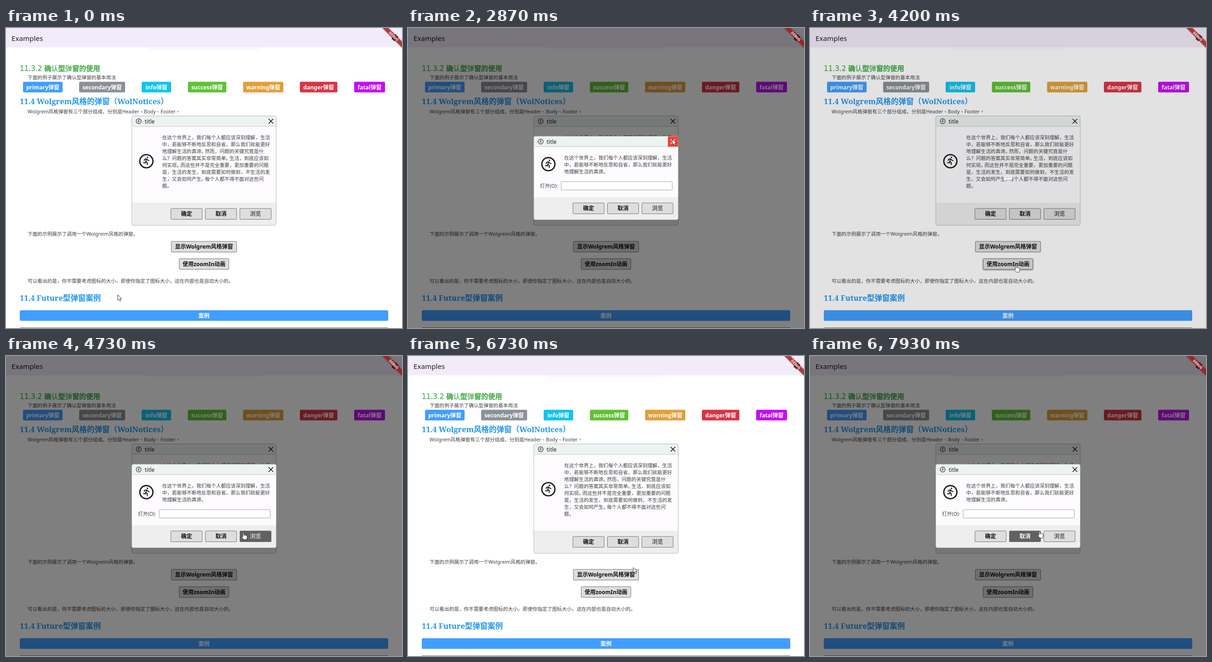
Write an HTML page that moves like this. It is 861x650 px and loops after 8 s.

```html
<!DOCTYPE html>
<html lang="zh-CN">
<head>
<meta charset="utf-8">
<title>Examples</title>
<style>
  html, body { margin: 0; width: 100%; height: 100%; overflow: hidden; background: #fff; }
  svg { display: block; width: 861px; height: 650px; }
  text { font-family: 'Noto Sans', 'Noto Sans CJK SC', 'Noto Sans CJK', sans-serif; font-size: 10.67px; fill: #3f3f3f; }
  .serif { font-family: 'Noto Serif', 'Noto Sans CJK TC', 'Noto Sans CJK', serif; font-size: 16.5px; font-weight: 700; fill: #2196f3; }
  .green { font-family: 'DejaVu Sans', 'Noto Sans CJK SC', 'Noto Sans CJK', sans-serif; font-size: 15.2px; fill: #4caf50; stroke: #4caf50; stroke-width: .3; }
  .centered { font-family: 'Noto Sans', 'Noto Sans CJK TC', 'Noto Sans CJK', sans-serif; }
  .label { font-size: 12px; font-weight: 600; text-anchor: middle; fill: #111; }
  .light { fill: #fff; }
  .button rect { fill: #dfdde0; stroke: #67676a; stroke-width: .9; }
  .button.hover rect { fill: #616161; }
  .button.hover text { fill: #fff; }
  .button.raised { filter: drop-shadow(0 1.5px 1.5px rgba(0,0,0,.45)); }
  .button.pressed rect { fill: #cfcdd1; }
</style>
</head>
<body>
<svg id="stage" viewBox="0 0 861 650"></svg>
<script>
const LOOP = 8000, ZOOM = 300, DIM = 0.5;
const stage = document.getElementById('stage');

// ---- markup helpers ----
const rect = (x, y, w, h, fill, more = '') =>
  `<rect x="${x}" y="${y}" width="${w}" height="${h}" fill="${fill}" ${more}/>`;
const text = (x, y, s, cls = '', more = '') => `<text x="${x}" y="${y}" class="${cls}" ${more}>${s}</text>`;
const thin = s => `<tspan font-weight="400">${s}</tspan>`;
const bold = s => `<tspan font-weight="700">${s}</tspan>`;

const button = ([x, y, w, h], label, id) =>
  `<g class="button" id="${id}">${rect(x, y, w, h, '', 'rx="1.5"')}${text(x + w / 2, y + h / 2 + 4.4, label, 'label')}</g>`;

const chip = (x, right, fill, name) =>
  rect(x, 116.5, right - x, 23, fill, 'rx="2.5"') + text((x + right) / 2, 132.6, name + '弹窗', 'label light');

const runner = (x, y, scale) => `
  <g transform="translate(${x} ${y}) scale(${scale}) translate(-12 -12)" fill="none" stroke="#1f1f1f" stroke-width="1.3">
    <circle cx="12" cy="12" r="9.3" stroke-width="1.9"/>
    <circle cx="13.5" cy="6.6" r="1.1" fill="#1f1f1f" stroke="none"/>
    <path d="M12.3 8.5L11.2 12.3L13.2 13.9V17.4M11.2 12.3L10.6 14.5L7.4 13.9M12.6 8.8L14 10.6L16.2 11.3M12.4 8.5L9.3 9.5L8.8 11.5"/>
  </g>`;

const cross = (y, stroke, id) =>
  `<path id="${id}" d="M571 ${y - 5}l10 10m0-10l-10 10" fill="none" stroke="${stroke}" stroke-width="1.5"/>`;

// Full stops are set tighter than the other characters.
const paragraph = (y, lines) => lines.map((line, i) =>
  text(339.5, y + i * 15, line.replace(/。(.)/g, '。<tspan dx="-3">$1</tspan>'))).join('');

const footerButtons = y => [358.5, 433.5, 508.5].map(x => [x, y, 68, 23.5]);

function dialog(id, top, bottom, iconY, lines, extra = '') {
  const names = ['确定', '取消', thin('浏览')];
  return rect(273.5, top, 314, bottom - top, '#eeeeee', 'rx="3.5"') +
    rect(273.5, top, 314, 28, '#ecf4ef', 'rx="3.5"') +
    rect(273.5, top + 22.5, 314, bottom - top - 71.5, '#fdfbfe') +
    `<path d="M276 ${top + 22.5}H586" stroke="#b4beb8" stroke-width=".9"/>` +
    rect(273.5, top, 314, bottom - top, 'none', 'rx="3.5" stroke="#a9a9ab" stroke-width=".8"') +
    runner(288.5, top + 11.5, .58) + text(301.5, top + 16, 'title', '', 'style="font-size:12px;fill:#222"') +
    `<g id="${id}Close" opacity="0">${rect(565, top + .5, 22.5, 22, '#f44336')}</g>` +
    cross(top + 11.5, '#111', id + 'Cross') +
    runner(305.2, iconY, 1.53) + paragraph(top + 50.5, lines) + extra +
    footerButtons(bottom - 36.5).map((box, i) => button(box, names[i], id + i)).join('');
}

// ---- scene ----
const intro = ['在这个世界上，我们每个人都应该深刻理解，生活', '中，若能够不断地反思和自省，那么我们就能更好'];
const essay = [...intro,
  '地理解生活的真谛。然而，问题的关键究竟是什', '么？问题的答案其实非常简单。生活，到底应该如',
  '何实现。而这些并不是完全重要，更加重要的问题', '是，生活的发生，到底需要如何做到，不生活的发',
  '生，又会如何产生。每个人都不得不面对这些问', '题。'];
const pageBoxes = [[359.5, 462.3, 142, 23.2], [376.5, 499.8, 108, 23.2]];
const popupBoxes = footerButtons(379);

stage.innerHTML = `
  <defs><filter id="blur"><feGaussianBlur stdDeviation="1.6"/></filter></defs>
  ${rect(0, 0, 861, 650, '#fff')}
  ${rect(305, 34, 251, 15, '#fbf9fd', 'rx="5"')}
  ${rect(0, 0, 861, 42, '#f2ecfa')}
  ${text(12, 27.6, 'Examples', '', 'style="font-size:15.2px;fill:#1d1b20"')}
  <g fill="none" stroke="#1d1b20"><circle cx="845.5" cy="21" r="4.2" stroke-width="2.6"/>
    <circle cx="845.5" cy="21" r="6.2" stroke-width="2" stroke-dasharray="2.9 1.97"/></g>
  ${text(30, 92.8, '11.3.2 ' + bold('确') + '认' + bold('型') + '弹' + bold('窗的使用'), 'green')}
  ${text(47, 111, '下面的例子展示了确认型弹窗的基本用法')}
  ${chip(37, 123, '#409eff', 'primary')}${chip(159, 259, '#8c9097', 'secondary')}
  ${chip(295, 359, '#11c4ee', 'info')}${chip(395.5, 479, '#60c135', 'success')}
  ${chip(515.5, 603, '#e0a03a', 'warning')}${chip(639, 720.5, '#d93444', 'danger')}
  ${chip(757, 824, '#c40ef2', 'fatal')}
  ${text(30, 165, '11.4 Wolgrem风格的弹窗（WolNotices）', 'serif')}
  ${text(47, 185, 'Wolgrem风格弹窗有三个部分组成，分别是Header、Body、Footer。', 'centered')}
  ${dialog('card', 190.5, 427.5, 288.6, essay)}
  ${text(47, 450, '下面的示例展示了调用一个Wolgreim风格的弹窗。')}
  ${button(pageBoxes[0], '显示Wolgrem风格弹窗', 'page0')}
  ${button(pageBoxes[1], '使用zoomIn动画', 'page1')}
  ${text(47, 552, '可以看出的是，你不需要考虑图标的大小，即使你指定了图标大小，这在内部也是自动大小的。')}
  ${text(30, 591, '11.4 Future型弹窗案例', 'serif')}
  ${rect(30, 611.5, 801, 23, '#409eff', 'rx="2.5"')}${text(430.5, 627.6, '案例', 'label light')}
  ${rect(30, 649, 801, 1, '#707074')}
  <rect id="barrier" width="861" height="650"/>
  <g id="popup">${dialog('popup', 234.5, 415.5, 295, [...intro, '地理解生活的真谛。'],
    text(287, 346.3, '打开(O):') +
    rect(333, 333, 241.5, 18, '#fff', 'rx="1.5" stroke="#97979a" stroke-width=".9"'))}</g>
  <g transform="translate(861 0) rotate(45)">
    ${rect(-45, 20.6, 90, 9.5, '#000', 'opacity=".4" filter="url(#blur)"')}
    ${rect(-45, 20.8, 90, 9.2, 'rgba(183,28,28,.7)')}
    ${text(0, 28.1, 'DEBUG', '', 'style="font-size:7.4px;font-weight:900;fill:#fff;text-anchor:middle"')}
  </g>
  <g id="cursor" stroke="#222" stroke-width=".9" stroke-linejoin="round" fill="#fff">
    <path id="arrow" d="M0 0V12L2.8 9.5L4.8 13.8L6.7 12.9L4.8 8.8H8.5Z"/>
    <path id="hand" d="M-1.2 .8Q0-.9 1.2 .8V5.5Q2.6 4.4 3.5 5.7Q5 4.9 5.8 6.2Q7.6 5.8 8 7.6V10.5Q7.8 13 6.6 15H.6Q-1.6 12-3.8 9.2Q-4.3 7.5-2.6 7.9L-1.2 9.2Z"/>
  </g>`;

const el = Object.fromEntries([...stage.querySelectorAll('[id]')].map(node => [node.id, node]));

// ---- motion ----
const popups = [[1114, 3040], [4150, 5968], [7440, Infinity]];
const presses = [[1000, 1130], [4070, 4200], [7270, 7460]];
const path = [
  [70, 243, 578], [730, 408, 517], [1400, 408, 517], [1800, 400, 441], [2050, 392, 398],
  [2200, 425, 390], [2380, 530, 388], [2670, 576, 246], [2730, 575, 241], [3040, 575, 241],
  [3530, 470, 478], [3930, 448, 514], [4450, 448, 514], [4870, 550, 318], [5300, 576, 247],
  [5600, 577.5, 252], [6470, 577.5, 252], [6730, 490, 458], [7130, 430, 512], [7500, 430, 512], [7930, 499, 379.3]];

const clamp = v => Math.max(0, Math.min(1, v));

function bezier(x1, y1, x2, y2) {
  const at = (a, b, u) => 3 * a * u * (1 - u) ** 2 + 3 * b * u * u * (1 - u) + u ** 3;
  return x => {
    let low = 0, high = 1;
    for (let i = 0; i < 20; i++) {
      const mid = (low + high) / 2;
      if (at(x1, x2, mid) < x) low = mid; else high = mid;
    }
    return at(y1, y2, low);
  };
}
const ease = bezier(.25, .1, .25, 1), easeInOut = bezier(.42, 0, .58, 1);

function pointer(t) {
  const next = path.findIndex(point => point[0] > t);
  if (next === 0) return path[0].slice(1);
  if (next < 0) return path.at(-1).slice(1);
  const [t0, x0, y0] = path[next - 1], [t1, x1, y1] = path[next];
  const k = (t - t0) / (t1 - t0);
  return [x0 + (x1 - x0) * k, y0 + (y1 - y0) * k];
}

function draw(t) {
  const current = popups.find(([open, close]) => t >= open && t < close + ZOOM);
  const progress = current ? clamp(Math.min(t - current[0], current[1] + ZOOM - t) / ZOOM) : 0;
  const scale = progress >= 1 ? 1 : easeInOut(progress);
  const [x, y] = pointer(t);
  const inside = ([bx, by, w, h]) => x >= bx && x <= bx + w && y >= by && y <= by + h;

  el.barrier.setAttribute('opacity', DIM * ease(progress));
  el.popup.setAttribute('display', progress > 0 ? 'inline' : 'none');
  el.popup.setAttribute('transform', `translate(430.5 325) scale(${scale}) translate(-430.5 -325)`);

  const pressed = presses.some(([from, to]) => t >= from && t < to);
  pageBoxes.forEach((box, i) => {
    const over = inside(box) && progress < .3;
    el['page' + i].classList.toggle('raised', over);
    el['page' + i].classList.toggle('pressed', over && pressed);
  });
  popupBoxes.forEach((box, i) => el['popup' + i].classList.toggle('hover', progress === 1 && inside(box)));

  const closing = current && t > current[1];
  const red = closing ? clamp(1 - (t - current[1]) / 200)
    : progress === 1 && inside([565, 235, 22.5, 22]) ? 1 : 0;
  el.popupClose.setAttribute('opacity', red);
  el.popupCross.setAttribute('stroke', red === 1 ? '#fff' : '#111');

  const overButton = pageBoxes.some(inside) || progress === 1 && popupBoxes.some(inside);
  el.hand.setAttribute('display', overButton ? 'inline' : 'none');
  el.arrow.setAttribute('display', overButton ? 'none' : 'inline');
  el.cursor.setAttribute('transform', `translate(${x} ${y})`);
}

const start = performance.now();
function frame() {
  draw((performance.now() - start) % LOOP);
  requestAnimationFrame(frame);
}
frame();
</script>
</body>
</html>
```
